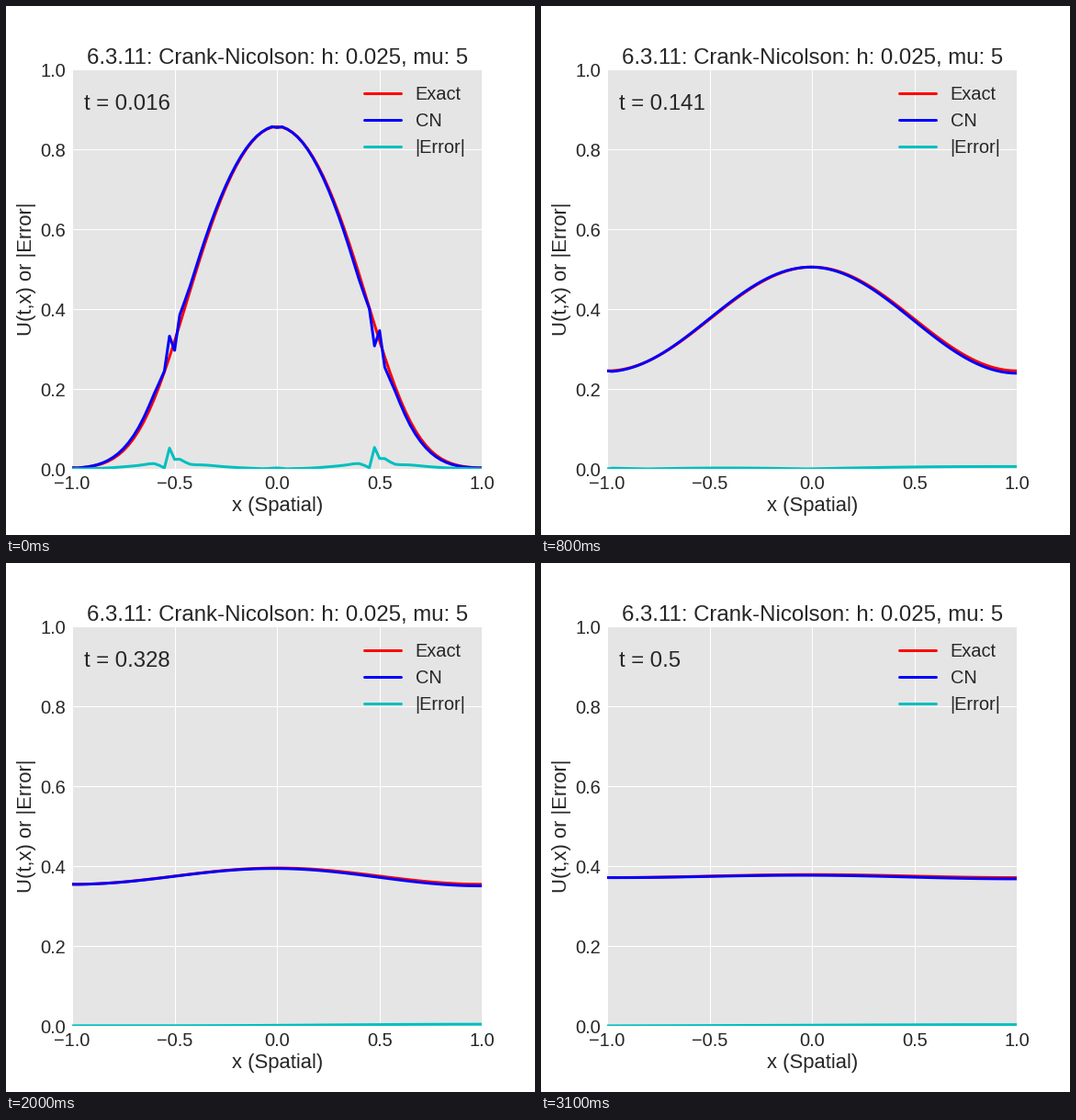
A matplotlib script for the animation above (3.2 s loop, 576 px wide and 576 px high).

```python
import numpy as np
import matplotlib.pyplot as plt
from matplotlib.animation import FuncAnimation

H, MU = 0.025, 5
DT = MU * H**2
FRAMES, STEPS = 32, 5

plt.rcParams.update({
    "font.family": "Liberation Sans",
    "text.color": "#262626",
    "axes.labelcolor": "#262626",
    "xtick.color": "#262626",
    "ytick.color": "#262626",
})

x = np.linspace(-1, 1, 81)


def exact(t):
    """Fourier series of the heat equation solution."""
    u = np.full_like(x, 3 / 8)
    for l in range(60):
        k = 2 * l + 1
        a = np.pi * k
        u += ((-1)**l / a + 2 / a**2) * np.cos(a * x) * np.exp(-a**2 * t)
        u += np.cos(2 * a * x) / a**2 * np.exp(-4 * a**2 * t)
    return u


def solve():
    """Crank-Nicolson: Dirichlet on the left, zero slope on the right."""
    n = len(x)
    lap = np.diag(np.full(n, -2.0)) + np.eye(n, k=1) + np.eye(n, k=-1)
    lap[0] = 0
    lap[-1, -2] = 2
    step = np.linalg.solve(np.eye(n) - MU / 2 * lap, np.eye(n) + MU / 2 * lap)

    inside = (x > -0.5 - H / 2) & (x < 0.5 - H / 2)
    v = np.where(inside, 1 - np.abs(x), 0)
    states = []
    for i in range(1, FRAMES * STEPS + 1):
        v = step @ v
        v[0] = exact(i * DT)[0]
        if i % STEPS == 0:
            states.append(v.copy())
    return states


states = solve()

fig = plt.figure(figsize=(8, 8), dpi=72, facecolor="white")
ax = fig.add_axes([0.125, 0.125, 0.775, 0.755], facecolor="#E5E5E5")
ax.set(xlim=(-1, 1), ylim=(0, 1))
ax.set_xticks(np.linspace(-1, 1, 5))
ax.set_yticks(np.linspace(0, 1, 6))
ax.tick_params(length=0, pad=7, labelsize=20)
ax.grid(color="white", lw=1, ls="-")
ax.set_axisbelow(True)
for spine in ax.spines.values():
    spine.set_visible(False)

ax.set_title("6.3.11: Crank-Nicolson: h: 0.025, mu: 5", fontsize=24, pad=6)
ax.set_xlabel("x (Spatial)", fontsize=22, labelpad=4)
ax.set_ylabel("U(t,x) or |Error|", fontsize=22, labelpad=4)


def curve(color, label):
    return ax.plot([], [], color=color, lw=3, label=label,
                   solid_capstyle="round")[0]


true_line = curve("r", "Exact")
cn_line = curve("b", "CN")
err_line = curve("c", "|Error|")
clock = ax.text(-0.94, 0.9, "", fontsize=24)
ax.legend(loc="upper right", fontsize=20, frameon=False)


def draw(i):
    t = (i + 1) * STEPS * DT
    u, v = exact(t), states[i]
    true_line.set_data(x, u)
    cn_line.set_data(x, v)
    err_line.set_data(x, np.abs(u - v))
    clock.set_text(f"t = {round(t, 3)}")
    return true_line, cn_line, err_line, clock


anim = FuncAnimation(fig, draw, frames=FRAMES, interval=100,
                     init_func=lambda: draw(0), repeat=True)
plt.show()
```
